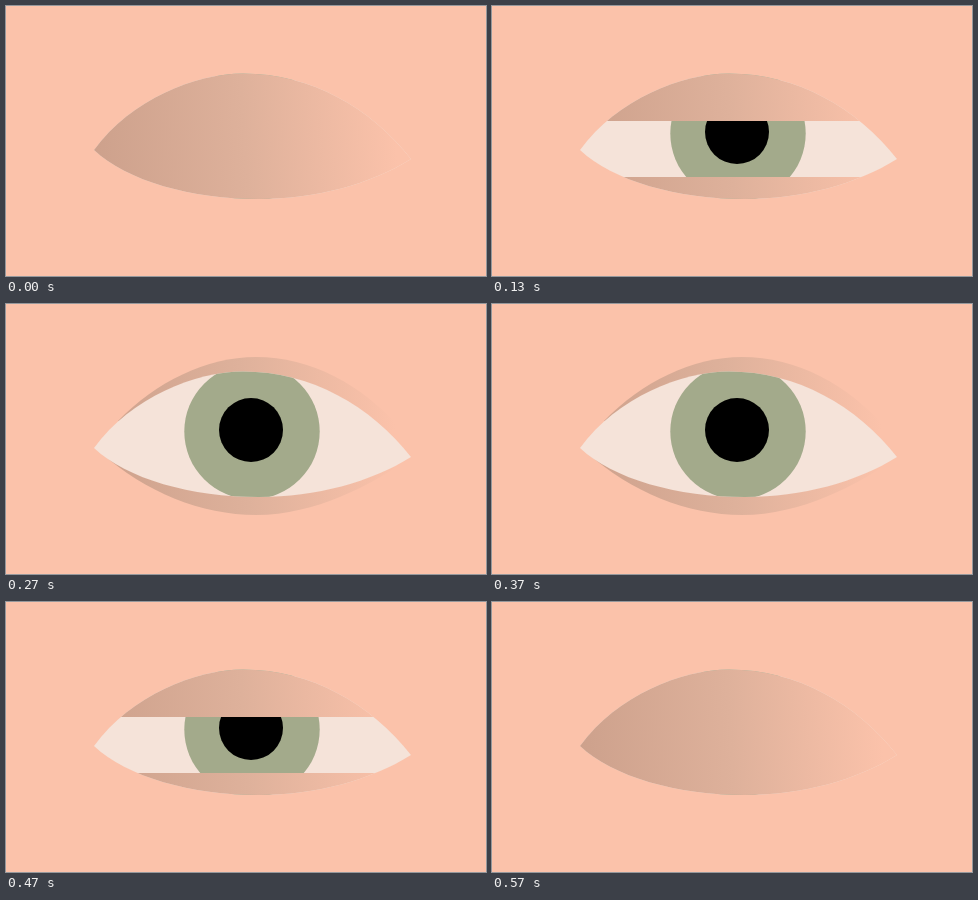
Recreate the animation shown at these times as an HTML page. Size 480 px wide and 270 px high, loop 0.71 s.

```html
<!DOCTYPE html>
<html lang="en">
<head>
<meta charset="utf-8">
<title>Blinking eye</title>
<style>
html, body { margin: 0; width: 100%; height: 100%; overflow: hidden; background: #fbc2aa; }
svg { display: block; width: 100vw; height: 100vh; }
</style>
</head>
<body>
<svg viewBox="0 0 480 270">
  <defs>
    <linearGradient id="skin" gradientUnits="userSpaceOnUse" x1="88" y1="150" x2="390" y2="130">
      <stop offset="0" stop-color="#cda18c"/>
      <stop offset=".5" stop-color="#deb19b"/>
      <stop offset="1" stop-color="#fbc2aa"/>
    </linearGradient>
    <path id="almond" d="M88 144C125 93 190 67.5 237 67.5C305 67.5 365 102 405 153C365 178 310 193 253 193C185 193 121 175 88 144Z"/>
    <clipPath id="eye"><use href="#almond"/></clipPath>
  </defs>
  <rect width="480" height="270" fill="#fbc2aa"/>
  <g id="folds" fill="url(#skin)">
    <path d="M112 117C150 78 200 53 250 53C305 53 355 80 395 125L250 138Z"/>
    <path d="M95 149C140 188 195 211 250 211C310 211 365 180 395 160L250 138Z"/>
  </g>
  <use href="#almond" fill="#f5e3d9"/>
  <g clip-path="url(#eye)">
    <circle cx="246" cy="127.5" r="67.7" fill="#a3aa8b"/>
    <circle cx="245" cy="126" r="32" fill="#000"/>
    <rect id="upper" x="80" y="60" width="340" fill="url(#skin)"/>
    <rect id="lower" x="80" width="340" fill="url(#skin)"/>
  </g>
</svg>
<script>
const LOOP = 710;
const $ = id => document.getElementById(id);

// Held poses: start in ms, upper lid edge, lower lid edge, fold height
const poses = [
  [0, 139, 139, 0],
  [70, 124, 154, 0],
  [100, 120, 162, 0],
  [130, 115, 171, 0],
  [170, 101, 180, 0],
  [220, 80, 189, 0.92],
  [270, 60, 200, 1],
  [470, 115, 171, 0],
  [500, 124, 154, 0],
  [570, 139, 139, 0]
];

function draw(ms) {
  const t = ms % LOOP;
  const [, top, bottom, fold] = poses.findLast(p => p[0] <= t);
  $("upper").setAttribute("height", top - 60);
  $("lower").setAttribute("y", bottom);
  $("lower").setAttribute("height", 200 - bottom);
  $("folds").style.display = fold ? "" : "none";
  $("folds").setAttribute("transform", `translate(0 ${138 * (1 - fold)}) scale(1 ${fold})`);
}

let start;
function tick(now) {
  start ??= now;
  draw(now - start);
  requestAnimationFrame(tick);
}
draw(0);
requestAnimationFrame(tick);
</script>
</body>
</html>
```
